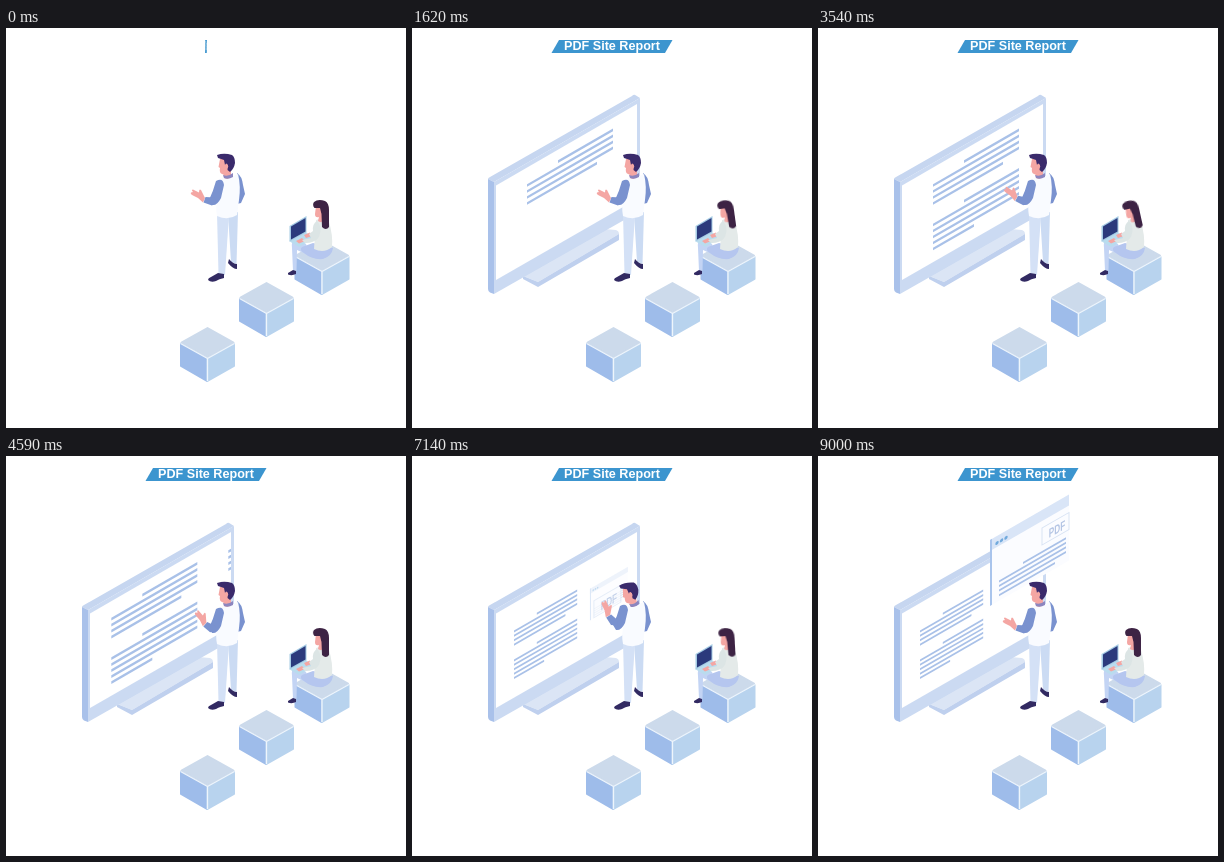
Write an HTML page that moves like this. It is 400 px wide and 400 px high and loops after 9.03 s.

```html
<!DOCTYPE html>
<html lang="en">
<head>
<meta charset="utf-8">
<title>PDF Site Report</title>
<style>
html, body { margin: 0; width: 100%; height: 100%; overflow: hidden; background: #fff; }
svg { display: block; width: 100vw; height: 100vh; }
text { font-family: "Liberation Sans", Arial, sans-serif; font-weight: bold; text-anchor: middle; }
.row { stroke: #a9c1e8; }
.sleeve { fill: #7a92cf; }
.skin { fill: #f4a6a3; }
.dark { fill: #322a62; }
.nod { transform-origin: 316px 190px; animation: nod 2257.5ms linear infinite; }
@keyframes nod {
  0%, 100% { transform: rotate(0); animation-timing-function: cubic-bezier(.37, 0, .63, 1); }
  50% { transform: rotate(-13deg); animation-timing-function: cubic-bezier(.37, 0, .63, 1); }
}
</style>
</head>
<body>
<svg viewBox="0 0 400 400">
  <defs>
    <clipPath id="screenClip"><path d="M84 157.500L225 76V171L84 252Z"/></clipPath>
    <g id="cube" stroke-linejoin="round" stroke-width="2">
      <path d="M1 17L27 31.500V54L1 39Z" fill="#9ebcea" stroke="#9ebcea"/>
      <path d="M54 17L27.500 31.500V54L54 39Z" fill="#b8d3ee" stroke="#b8d3ee"/>
      <path d="M1.500 15.500L27.500 1L53.500 15.500L27.500 30Z" fill="#ccdaeb" stroke="#ccdaeb"/>
      <path d="M.5 16.500L27.500 31.500L54.500 16.500M27.500 31.500V54" fill="none" stroke="#eef5fc" stroke-width="1.300"/>
    </g>
  </defs>

  <g id="title">
    <path d="M147 12H260.500L253 25H139.500Z" fill="#3c95cf"/>
    <text x="200" y="22.400" font-size="12.600" fill="#fff">PDF Site Report</text>
  </g>

  <g id="monitor">
    <path d="M111 248L192 201L204 202Q207 203 207 206L126 254Z" fill="#dbe5f5"/>
    <path d="M111 248L126 254L207 206V212L126 259L111 251Z" fill="#bfd0ee"/>
    <path d="M76 151Q76 150 78 149L220 68Q222 66 224 67.500L228 70L82 154Z" fill="#c6d6f0"/>
    <path d="M76 151L82 154V266L78 264.500Q76 263.500 76 261Z" fill="#a9c1ea"/>
    <path d="M82 154L228 70V183L82 266Z" fill="#cbdaf2"/>
    <path d="M84 157.500L225 76V171L84 252Z" fill="#fff"/>
    <g clip-path="url(#screenClip)"><g id="pages"></g></g>
  </g>

  <g id="panel">
    <rect width="79" height="66" fill="#fbfcff"/>
    <rect width="79" height="11" fill="#d9e5f7"/>
    <rect width="2" height="66" fill="#a9c4ec"/>
    <g fill="#72aadd">
      <circle cx="7" cy="7" r="1.700"/><circle cx="11.500" cy="7" r="1.700"/><circle cx="16" cy="7" r="1.700"/>
    </g>
  </g>
  <g id="badge">
    <rect width="27" height="17" fill="#fbfcff" stroke="#d9e4f4" stroke-width="1"/>
    <text transform="translate(15 14) scale(1 1.550)" font-size="8.200" fill="#b4c5e4">PDF</text>
  </g>

  <use href="#cube" x="174" y="299"/>
  <use href="#cube" x="233" y="254"/>
  <use href="#cube" x="288.500" y="212"/>

  <g id="woman">
    <path d="M300 216L288 213Q285 214 286 220L287 243H290.500L291 222L304 228Z" fill="#c3d4f4"/>
    <path d="M287 242L290 243V246Q286 248 282 246.500V245Z" class="dark"/>
    <path d="M307 215L296 219Q293 222 298 225Q306 232 317 231Q326 228 327 220Z" fill="#b5c6ef"/>
    <path d="M310 192Q318 188 323 194Q327 207 326 219Q318 226 308 221Z" fill="#e4eae9"/>
    <path d="M283 213L300 204.500L309 210L293 219Z" fill="#b9dcee"/>
    <path d="M283.500 198L300.500 188V204.500L283.500 213.500Z" fill="#a5cbe4"/>
    <path d="M285 198.500L299.500 190V203.500L285 211.500Z" fill="#2b3a7c"/>
    <path d="M298 207L304 204.500L306 208L300 210ZM290 213L296 210L299 213L293 215.500Z" class="skin"/>
    <path d="M311 193Q306 196 307 203L303 206L305 210L296 212L299 215Q309 215 313 209Q317 199 311 193Z" fill="#dce5e5"/>
    <g class="nod">
      <path d="M310 178L317 177L319 191Q316 196 312 193L313 189Q309 190 309 186Z" class="skin"/>
      <path d="M308 174Q312 170.500 319 173Q323 175 323 182V199Q320 203 316 199L315.500 186L314 180L308.500 180Q306 177 308 174Z" fill="#3d2344"/>
    </g>
  </g>

  <g id="man">
    <path d="M231 145Q236 148 237 157L239 166L235 175L231 176Z" class="sleeve"/>
    <path d="M222 186L232 184L230.500 236L225 234Z" fill="#cbdbf3"/>
    <path d="M211 185L223 187L219 247L212.500 246Z" fill="#d4e1f6"/>
    <path d="M223 231Q227 236 231 236V241Q227 241 222 235Z" class="dark"/>
    <path d="M212 245L218 246V250Q213 251 210 253Q205 255 202 252Q202 250 205 249Z" class="dark"/>
    <path d="M214 152Q218 148 225 149L232 146Q235 158 233 172L231 187Q222 193 211 188Q209 178 212 168Z" fill="#f9fbff"/>
    <g id="head">
      <path d="M217 143H225V149Q222 152 218 150Z" class="skin"/>
      <path d="M217 147Q222 149 227 145L227 149Q222 152 218 150Z" fill="#8c86bf"/>
      <path d="M214 131L223 130L225 142Q221 148 216 146Q213 145 214 140L212.500 139Z" class="skin"/>
      <path d="M211 127Q218 124.500 226 127Q229 129 229 135Q228 141 224 144L221.500 142L222 137Q220 134 219 137L218 132L212 130Z" fill="#3a2a6b"/>
      <circle cx="220.500" cy="138.500" r="1.700" class="skin"/>
    </g>
    <g id="upperArm">
      <path d="M210 153Q217 149 218 157L215 170Q211 178 206 177L203 172Q207 164 210 153Z" class="sleeve"/>
    </g>
    <g id="forearm">
      <path d="M199 170L195 162Q193 160 193 164.500L187 161.500Q185 162 187 164L185 164.500Q184 166 187 167.500L192 170L197 174.500Z" class="skin"/>
      <path d="M199.500 169L208 169.500L211 174L206 177.500L197.500 174.500Z" class="sleeve"/>
    </g>
  </g>
</svg>
<script>
const LOOP = 9030, SLOPE = -0.577, PITCH = 117;
const $ = id => document.getElementById(id);
const clamp = v => Math.min(1, Math.max(0, v));
const phase = (t, start, length) => clamp((t - start) / length);
const smooth = p => (1 - Math.cos(Math.PI * p)) / 2;
const outCubic = p => 1 - (1 - p) ** 3;
const outBack = p => 1 + 2.70158 * (p - 1) ** 3 + 1.70158 * (p - 1) ** 2;
function inOutBack(p) {
  const k = 2.59491, u = 2 * p;
  return u < 1 ? u * u * ((k + 1) * u - k) / 2
               : ((u - 2) ** 2 * ((k + 1) * (u - 2) + k) + 2) / 2;
}
const iso = (x, y, s = 1) => `matrix(${s} ${SLOPE * s} 0 ${s} ${x} ${y})`;
const place = (id, value) => $(id).setAttribute('transform', value);

function add(parent, name, attrs = {}) {
  const el = document.createElementNS('http://www.w3.org/2000/svg', name);
  for (const key in attrs) el.setAttribute(key, attrs[key]);
  return parent.appendChild(el);
}
function addRows(parent, spans, y, gap, width) {
  return spans.map(([x1, x2], i) => ({
    x1, x2,
    el: add(parent, 'line', { class: 'row', x1, x2, y1: y + i * gap, y2: y + i * gap, 'stroke-width': width })
  }));
}
function grow(rows, t, start) {
  rows.forEach(({ x1, x2, el }, i) => {
    const p = outCubic(phase(t, start + i * 45, 240));
    el.setAttribute('x2', x1 + (x2 - x1) * p);
    el.style.display = p ? '' : 'none';
  });
}

const full = [0, 86];
const pages = [0, 1, 2, 3].map(i => {
  const el = add($('pages'), 'g', { transform: `translate(${i * PITCH} 0)` });
  return {
    el,
    top: addRows(el, [[31, 86], full, full, full, [0, 70]], 0, 6, 2.7),
    bottom: addRows(el, [[31, 86], full, full, full, full, [0, 41]], 39.5, 6, 2.7)
  };
});
addRows($('panel'), [[33, 76], [9, 76], [9, 76], [9, 76], [9, 65]], 42, 4.6, 2);

// Pairs of time and value, eased between neighbours
const armKeys = [[0, 0], [2430, 0], [2700, 20], [3120, 0], [3540, 8], [3900, 22], [4250, 0],
  [4590, 22], [5450, 22], [5760, 12], [6100, 0], [6600, 0], [7140, 38], [7800, 0], [LOOP, 0]];
const headKeys = [[0, 0], [5400, 0], [5760, -4], [6600, -4], [7140, -12], [7800, 0], [LOOP, 0]];
function track(keys, t) {
  const i = keys.findIndex(k => k[0] > t);
  const [t0, a] = keys[i - 1], [t1, b] = keys[i];
  return a + (b - a) * smooth((t - t0) / (t1 - t0));
}

function drawScreen(t) {
  const size = Math.max(0, outBack(phase(t, 560, 960)));
  $('monitor').style.display = t > 560 ? '' : 'none';
  place('monitor', `translate(142 219) scale(${size}) translate(-142 -219)`);
  grow(pages[0].top, t, 1180);
  grow(pages[0].bottom, t, 1910);

  const swipe = inOutBack(phase(t, 2430, 900)) + inOutBack(phase(t, 3850, 900));
  const shrink = smooth(phase(t, 5500, 560));
  pages.forEach((page, i) => page.el.style.display = t < 4750 || i === 2 ? '' : 'none');
  place('pages', iso(115 - 13 * shrink, 151.5 + 19.5 * shrink, 1 - 0.265 * shrink) +
    ` translate(${-PITCH * swipe} 0)`);
}

function drawPanel(t) {
  const p = smooth(phase(t, 6600, 1200)), q = 1 - p;
  place('panel', iso(172 + 10.3 * q, 84 + 84.5 * q, 0.1 + 0.9 * p));
  place('badge', iso(224 - 73 * q, 72 + 126 * q));
  $('panel').style.opacity = p;
  $('badge').style.opacity = Math.sqrt(p);
}

function drawMan(t) {
  const angle = track(armKeys, t), lift = Math.max(0, angle - 22) / 16;
  place('upperArm', `translate(${-2 * lift} ${-3 * lift})`);
  place('forearm', `translate(${-4 * lift} ${-6 * lift}) rotate(${angle} 208 172)`);
  place('head', `rotate(${track(headKeys, t)} 222 147)`);
}

function draw(t) {
  const wide = Math.max(0.015, outCubic(phase(t, 60, 640)));
  place('title', `translate(200 0) scale(${wide} 1) translate(-200 0)`);
  drawScreen(t);
  drawPanel(t);
  drawMan(t);
}

const start = performance.now();
function tick() {
  draw((performance.now() - start) % LOOP);
  requestAnimationFrame(tick);
}
tick();
</script>
</body>
</html>
```
